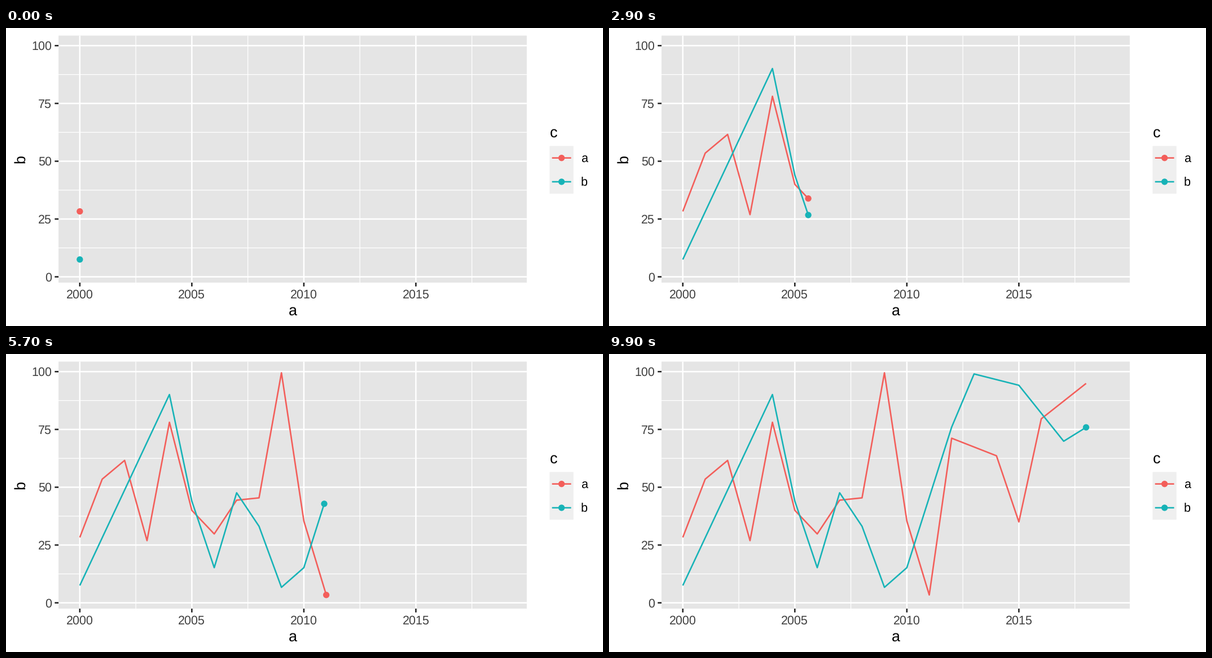
Write a matplotlib script that moves like this. It is 1058 px wide and 529 px high and loops after 10000 ms.

```python
import matplotlib.pyplot as plt
from matplotlib.animation import FuncAnimation
from matplotlib.patches import Circle, Rectangle

W, H, DPI = 1058, 529, 92
FRAMES, INTERVAL = 100, 100
SPAN = 19                      # years on the x axis
LEFT, RIGHT, TOP, BOTTOM = 93.1, 922.9, 13.5, 452.0
LINE, DOT, TICK = 2.61, 5.65, 6.73
TEXT, TITLE = 21.55, 26.94
RED, TEAL, GREY = "#F35E5A", "#17B3B7", "#404040"

# One value per year. Where one series has a gap, the other holds two
# values: its dot heads for the first and then jumps to the second.
GAP = None
SERIES_A = [28.3, 53.5, 61.6, 26.9, 78.1, 40, 29.8, 44.4, 45.4, 99.5,
            35.4, 3.4, 71.2, GAP, 63.6, 35, 79.6, GAP, 94.9]
SERIES_B = [7.5, GAP, GAP, GAP, 90.1, 44, 15.2, 47.6, 33.1, 6.7,
            15.2, GAP, 76, 99, GAP, 94.1, GAP, 69.9, 75.9]
FIRST_VALUES = {2: 65.1, 14: 2.4, 17: 81.5}
USUAL_FIRST = 50
FINAL = (SPAN, 14.8, GAP)      # the teal dot heads here but never settles

plt.rcParams["font.family"] = "Liberation Sans"
plt.rcParams["text.hinting"] = "none"


def pt(px):
    return px * 72 / DPI


def px_x(year):
    return 130.8 + 39.705 * year


def px_y(value):
    return 441.7 - 4.104 * value


fig = plt.figure(figsize=(W / DPI, H / DPI), dpi=DPI, facecolor="white")
ax = fig.add_axes([0, 0, 1, 1])
ax.set_xlim(0, W)
ax.set_ylim(H, 0)
ax.axis("off")


def stroke(xs, ys, color, width=LINE, z=2):
    line, = ax.plot(xs, ys, color=color, lw=pt(width), zorder=z, snap=False,
                    solid_capstyle="butt", solid_joinstyle="round")
    return line


def box(x0, y0, x1, y1, color):
    ax.add_patch(Rectangle((x0, y0), x1 - x0, y1 - y0, fc=color, lw=0,
                           zorder=0, snap=False))


def dot(x, y, color, z=6):
    return ax.add_patch(Circle((x, y), DOT, fc=color, lw=0, zorder=z))


def label(x, y, text, size, color="black", ha="center", rotation=0):
    ax.text(x, y, text, size=pt(size), color=color, ha=ha, va="baseline",
            rotation=rotation, rotation_mode="anchor")


def draw_panel():
    box(LEFT, TOP, RIGHT, BOTTOM, "#E5E5E5")
    for i in range(4):
        x = px_x(5 * i)
        mid_x, mid_y = px_x(5 * i + 2.5), px_y(25 * i + 12.5)
        stroke([mid_x, mid_x], [TOP, BOTTOM], "white", LINE / 2, 1)
        stroke([LEFT, RIGHT], [mid_y, mid_y], "white", LINE / 2, 1)
        stroke([x, x], [TOP, BOTTOM], "white")
        stroke([x, x], [BOTTOM, BOTTOM + TICK], "#262626")
        label(x, 479.5, str(2000 + 5 * i), TEXT, GREY)
    for value in range(0, 101, 25):
        y = px_y(value)
        stroke([LEFT, RIGHT], [y, y], "white")
        stroke([LEFT - TICK, LEFT], [y, y], "#262626")
        label(81, y + 7.7, str(value), TEXT, GREY, ha="right")
    label(508, 510.2, "a", TITLE)
    label(32.8, 232.4, "b", TITLE, rotation=90)


def draw_legend():
    x0, y0, side = 963.4, 209.5, 42.32
    label(x0, 193.3, "c", TITLE, ha="left")
    box(x0, y0, x0 + side, y0 + 2 * side, "#EFEFEF")
    for i, (name, color) in enumerate((("a", RED), ("b", TEAL))):
        y = y0 + (i + 0.5) * side
        stroke([x0 + 0.1 * side, x0 + 0.9 * side], [y, y], color)
        dot(x0 + side / 2, y, color)
        label(1019.1, y + 8.2, name, TEXT, ha="left")


def key_frame(year):
    return round((FRAMES - 1) * year / SPAN)


def make_stops(values, others):
    """List (year, value headed for, value settled on)."""
    stops = []
    for year, (value, other) in enumerate(zip(values, others)):
        if value is not GAP:
            twice = other is GAP
            aim = FIRST_VALUES.get(year, USUAL_FIRST) if twice else value
            stops.append((year, aim, value))
    return stops


class Trace:
    def __init__(self, stops, color, z):
        self.stops = stops
        self.line = stroke([], [], color, z=z)
        self.dot = dot(0, 0, color, z + 2)

    def show(self, frame):
        path = []
        for year, aim, settled in self.stops:
            key = key_frame(year)
            if key <= frame:
                if settled is not GAP:
                    path.append((year, settled))
                continue
            last_year, last = path[-1]
            start = key_frame(last_year)
            part = (frame - start) / (key - start)
            path.append((last_year + part * (year - last_year),
                         last + part * (aim - last)))
            break
        xs = [px_x(year) for year, _ in path]
        ys = [px_y(value) for _, value in path]
        self.line.set_data(xs, ys)
        self.dot.center = xs[-1], ys[-1]
        self.dot.set_visible(frame <= key_frame(self.stops[-1][0]))


draw_panel()
draw_legend()
traces = [Trace(make_stops(SERIES_A, SERIES_B), RED, 4),
          Trace(make_stops(SERIES_B, SERIES_A) + [FINAL], TEAL, 5)]


def update(frame):
    for trace in traces:
        trace.show(frame)
    return [artist for t in traces for artist in (t.line, t.dot)]


anim = FuncAnimation(fig, update, frames=FRAMES, interval=INTERVAL,
                     init_func=lambda: update(0), repeat=True)
plt.show()
```
